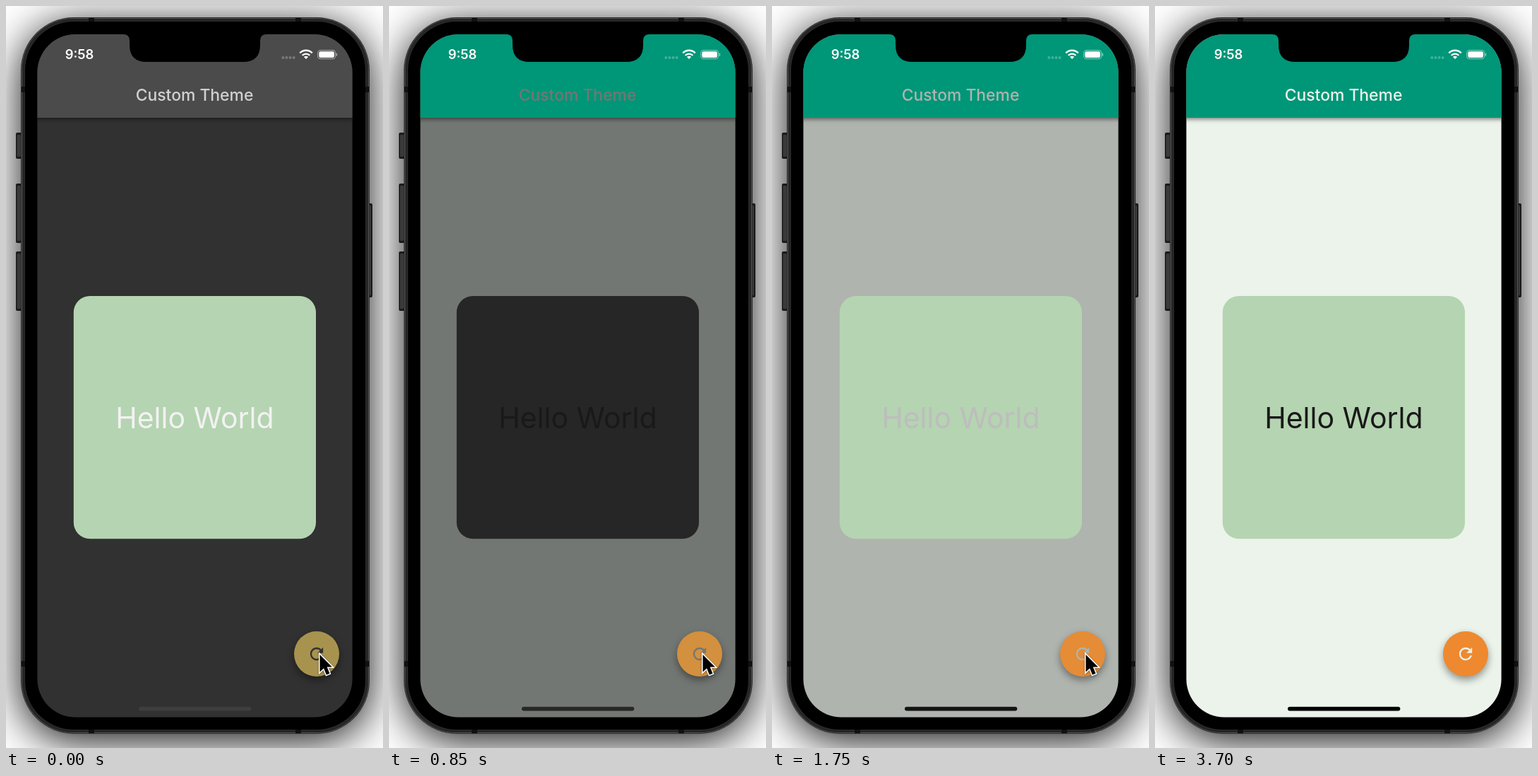
An HTML page with a canvas that plays this animation: 534 px wide and 1049 px high, repeating every 3.75 s.

```html
<!DOCTYPE html>
<html lang="en">
<head>
<meta charset="utf-8">
<title>Custom Theme</title>
<style>
  html, body { margin: 0; width: 100%; height: 100%; overflow: hidden; background: #fff; }
  canvas { display: block; width: 534px; height: 1049px; }
</style>
</head>
<body>
<canvas id="stage"></canvas>
<script>
const W = 534, H = 1049, LOOP = 3750, STEP = 50;
const FADE = 155, TEXT_FADE = 310;
const TOGGLES = [
  { at: -22, light: true },
  { at: 765, light: false },
  { at: 1638, light: true },
];
const GREEN = [0, 150, 120], WHITE = [255, 255, 255];
const LIGHT = { bg: [235, 243, 235], card: [181, 212, 177], ink: [25, 25, 25], fab: [238, 137, 47], home: [0, 0, 0] };
const DARK = { bg: [17, 17, 17], card: [38, 38, 38], ink: WHITE, fab: [239, 148, 63], home: [72, 72, 72] };
const REFRESH = new Path2D('M17.65 6.35C16.2 4.9 14.21 4 12 4c-4.42 0-7.99 3.58-7.99 8s3.57 8 7.99 8c3.73 0 6.84-2.55 7.73-6h-2.08c-.82 2.33-3.04 4-5.65 4-3.31 0-6-2.69-6-6s2.69-6 6-6c1.66 0 3.14.69 4.22 1.78L13 11h7V4z');
const NOTCH = new Path2D('M166 39H369V40Q360 40 360 49V55Q360 79 336 79H199Q175 79 175 55V49Q175 40 166 40Z');
const ARROW = new Path2D('M0 0V24.5L5.6 19.3L9.3 28.6L14 26.7L10.2 17.6H17.4Z');

const canvas = document.getElementById('stage');
const ctx = canvas.getContext('2d');
const dpr = window.devicePixelRatio || 1;
canvas.width = W * dpr;
canvas.height = H * dpr;

const clamp = v => Math.min(1, Math.max(0, v));
const mix = (a, b, p) => a.map((v, i) => v + (b[i] - v) * p);
const css = c => `rgb(${c.map(Math.round).join(',')})`;

function box(x, y, w, h, r, fill) {
  ctx.fillStyle = fill;
  ctx.beginPath();
  ctx.roundRect(x, y, w, h, r);
  ctx.fill();
}

function disc(x, y, r, fill) {
  ctx.fillStyle = fill;
  ctx.beginPath();
  ctx.arc(x, y, r, 0, 2 * Math.PI);
  ctx.fill();
}

function outline(x, y, w, h, r, color, width) {
  ctx.strokeStyle = color;
  ctx.lineWidth = width;
  ctx.beginPath();
  ctx.roundRect(x, y, w, h, r);
  ctx.stroke();
}

function label(text, x, y, size, weight, color) {
  ctx.font = `${weight} ${size}px Inter, sans-serif`;
  ctx.textAlign = 'center';
  ctx.fillStyle = color;
  ctx.fillText(text, x, y);
}

function withShadow(color, blur, dy, draw) {
  ctx.save();
  ctx.shadowColor = color;
  ctx.shadowBlur = blur * dpr;
  ctx.shadowOffsetY = dy * dpr;
  draw();
  ctx.restore();
}

// Text fades trail the rest of the theme.
function textProgress(age, light) {
  if (!light) return clamp((age - 90) / (TEXT_FADE - 90));
  return age < FADE ? 0.4 * age / FADE : clamp(0.4 + 0.6 * (age - FADE) / (TEXT_FADE - FADE));
}

function themeAt(t) {
  const { at, light } = TOGGLES.filter(k => k.at <= t).pop();
  const age = t - at;
  const p = clamp(age / FADE);
  const level = light ? p : 1 - p;
  const ink = textProgress(age, light);
  const bg = mix(DARK.bg, LIGHT.bg, level);
  const green = level > (light ? 0.5 : 0.4);
  const splash = Math.max(...TOGGLES.map(k => {
    const d = t - k.at;
    return 0.36 * clamp(d < 0 ? 1 + d / 110 : 1 - d / 125);
  }));
  return {
    bg: css(bg),
    bar: css(green ? GREEN : mix([51, 51, 51], [215, 218, 215], level)),
    title: css(green ? bg : mix(WHITE, LIGHT.ink, level * 1.4)),
    card: css((light ? LIGHT : DARK).card),
    ink: css(mix(DARK.ink, LIGHT.ink, light ? ink : 1 - ink)),
    fab: css(mix(mix(DARK.fab, LIGHT.fab, level), GREEN, splash)),
    home: css(mix(DARK.home, LIGHT.home, level)),
  };
}

function sideButton(x, y, w, h) {
  box(x, y, w, h, 2, '#1b1b1b');
  box(x + 1.5, y + 3, w - 3.5, h - 6, 1.5, '#3a3a3a');
}

function drawPhone() {
  ctx.fillStyle = '#fff';
  ctx.fillRect(0, 0, W, H);
  withShadow('rgba(0,0,0,0.95)', 60, 10, () => box(22, 17, 492, 1011, 74, '#1a1a1a'));
  [[179, 37], [251, 84], [347, 84]].forEach(([y, h]) => sideButton(14, y, 9, h));
  sideButton(512, 279, 7, 133);
  box(21, 16, 494, 1013, 75, '#2b2b2b');
  outline(22.5, 17.5, 491, 1010, 73, '#555', 1);
  outline(24.5, 19.5, 487, 1006, 71, '#252525', 3);
  ctx.fillStyle = '#111';
  for (const x of [117, 410]) ctx.fillRect(x, 17, 8, 5);
  for (const x of [117, 410]) ctx.fillRect(x, 1023, 8, 5);
  for (const y of [114, 926]) {
    ctx.fillRect(22, y, 5, 8);
    ctx.fillRect(509, y, 5, 8);
  }
  box(27, 22, 482, 1001, 69, '#000');
}

function drawStatus() {
  label('9:58', 104, 75, 18.4, 600, '#fff');
  for (let i = 0; i < 4; i++) disc(392.3 + i * 5.1, 73, 2, 'rgba(255,255,255,0.25)');

  ctx.save();
  ctx.beginPath();
  ctx.moveTo(425, 75);
  ctx.arc(425, 75, 20, -Math.PI * 0.755, -Math.PI * 0.245);
  ctx.clip();
  disc(425, 75, 4.2, '#fff');
  ctx.strokeStyle = '#fff';
  ctx.lineWidth = 2.4;
  for (const r of [7.4, 12.2]) {
    ctx.beginPath();
    ctx.arc(425, 75, r, 0, 2 * Math.PI);
    ctx.stroke();
  }
  ctx.restore();

  outline(441.6, 62.6, 25, 12, 3.8, 'rgba(255,255,255,0.45)', 1.1);
  box(443.3, 64.3, 21.6, 8.6, 2.2, '#fff');
  box(467.6, 66.5, 1.5, 4.4, 1, 'rgba(255,255,255,0.5)');
}

function drawScreen(c) {
  ctx.save();
  ctx.beginPath();
  ctx.roundRect(44.4, 40, 446.2, 965.5, 54);
  ctx.clip();
  ctx.fillStyle = c.bg;
  ctx.fillRect(44, 40, 447, 966);
  withShadow('rgba(0,0,0,0.5)', 6, 2, () => {
    ctx.fillStyle = c.bar;
    ctx.fillRect(30, 30, 475, 128);
  });
  ctx.fillStyle = '#000';
  ctx.fill(NOTCH);
  drawStatus();
  label('Custom Theme', 267, 134.3, 22.9, 500, c.title);
  box(95.8, 410, 343.2, 343.2, 23, c.card);
  label('Hello World', 267.4, 597, 41, 400, c.ink);
  withShadow('rgba(0,0,0,0.4)', 11, 5, () => disc(440, 916, 32, c.fab));
  ctx.save();
  ctx.translate(440 - 13.72, 916 - 13.72);
  ctx.scale(1.1436, 1.1436);
  ctx.fillStyle = c.bg;
  ctx.fill(REFRESH);
  ctx.restore();
  box(188, 990.7, 159.3, 5.7, 2.85, c.home);
  ctx.restore();
}

function drawCursor(t) {
  const away = clamp((t - 2500) / 300) ** 2;
  if (away === 1) return;
  ctx.save();
  ctx.translate(444.5 + 110 * away, 917 + 145 * away);
  ctx.lineJoin = 'miter';
  ctx.strokeStyle = '#fff';
  ctx.lineWidth = 3;
  withShadow('rgba(0,0,0,0.35)', 3, 1, () => ctx.stroke(ARROW));
  ctx.fillStyle = '#000';
  ctx.fill(ARROW);
  ctx.restore();
}

function frame(now) {
  const t = Math.floor((now % LOOP) / STEP) * STEP;
  ctx.setTransform(dpr, 0, 0, dpr, 0, 0);
  drawPhone();
  drawScreen(themeAt(t));
  drawCursor(t);
  requestAnimationFrame(frame);
}
requestAnimationFrame(frame);
</script>
</body>
</html>
```
